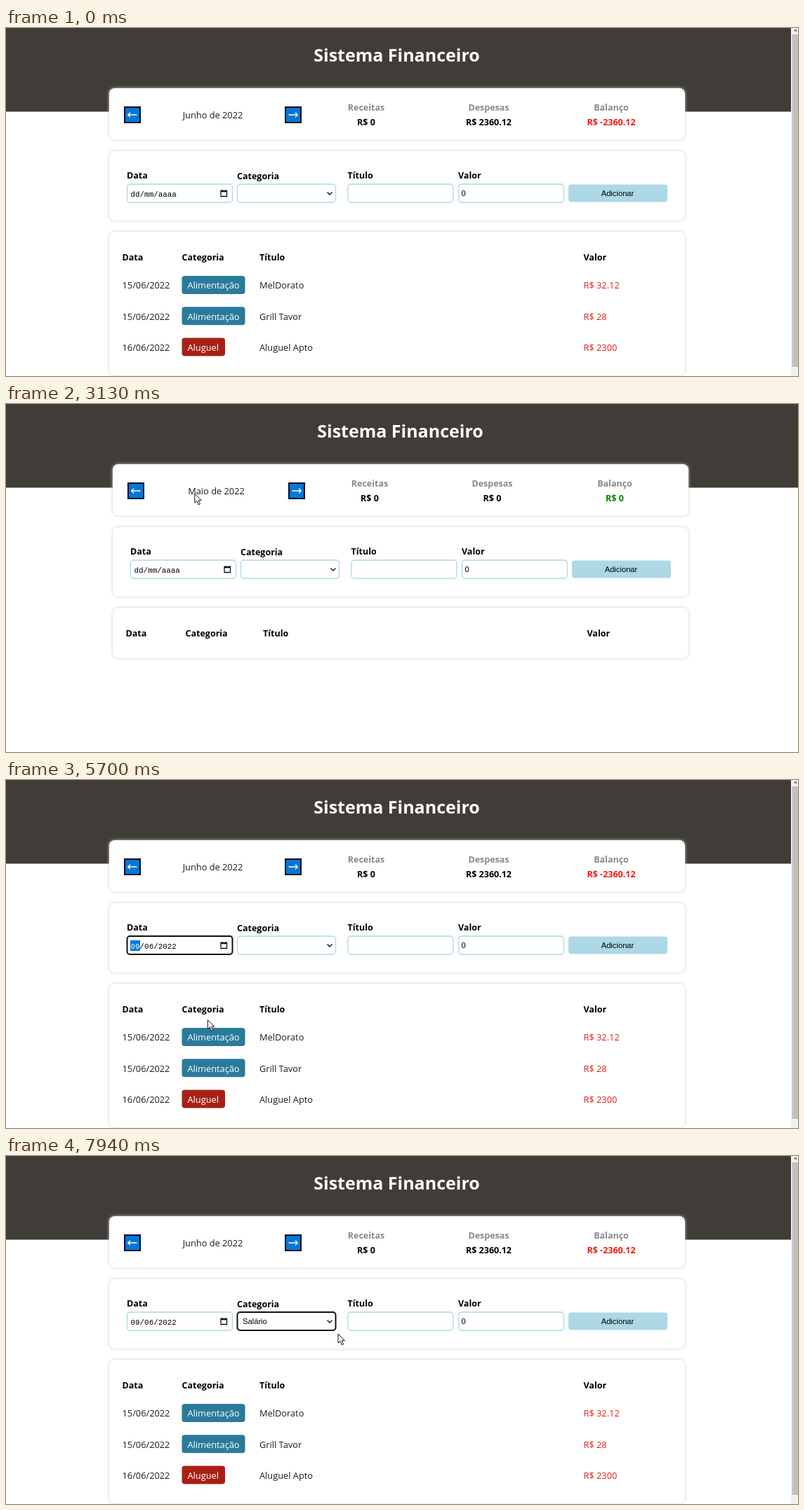
Write an HTML page that moves like this. It is 1128 px wide and 497 px high and loops after 8000 ms.

```html
<!DOCTYPE html>
<html lang="pt-BR">
<head>
<meta charset="utf-8">
<title>Sistema Financeiro</title>
<style>
  html, body { margin: 0; width: 100%; height: 100%; overflow: hidden; background: #fff; }
  svg { display: block; width: 1128px; height: 497px; }
  text { font: 12.8px "Open Sans", "Noto Sans", sans-serif; fill: #1c1c1c; white-space: pre; }
  .b { font-weight: 700; font-size: 12.5px; fill: #000; }
  .h1 { font-weight: 700; font-size: 25px; fill: #fff; }
  .mid { text-anchor: middle; }
  .grey { fill: #888; }
  .red { fill: #ec1c0e; }
  .green { fill: green; }
  .white { fill: #fff; }
  .ui { font: 11.2px "Liberation Sans", Arial, sans-serif; fill: #000; }
  .mono { font: 10.9px "Liberation Mono", monospace; fill: #000; }
  .cal { font: 10.1px "Liberation Sans", Arial, sans-serif; fill: #111; }
  .strong { font-weight: 700; }
  .dim { fill: #777; }
  .link { fill: #1b70c0; }
  .ui.white, .mono.white, .cal.white { fill: #fff; }
  .card { fill: #fff; filter: drop-shadow(0 0 2px #ccc); }
  .line { fill: none; stroke: #111; stroke-width: 1.3; }
</style>
</head>
<body>
<svg id="stage" viewBox="0 0 1128 497"></svg>
<script>
const LOOP = 8000;
const stage = document.getElementById('stage');

// Pointer path: time, x, y
const path = [
  [390, 936, 262], [600, 780, 140], [800, 540, 89], [1060, 205, 122], [1190, 270, 126],
  [1400, 411, 122], [1660, 411, 122], [2060, 184, 131], [2130, 186, 132], [2860, 186, 132],
  [3530, 417, 121], [3750, 417, 121], [4420, 445, 205], [4490, 457, 226], [4690, 306, 233],
  [4890, 306, 233], [5240, 264, 340], [5370, 284, 346], [5640, 284, 346], [6230, 394, 232],
  [6390, 394, 232], [6930, 401, 286], [7130, 401, 288], [7200, 402, 294], [7340, 402, 294],
  [7440, 403, 289], [7540, 403, 294], [7790, 403, 294], [7940, 473, 254]
];
const clicks = [1500, 2330, 2790, 3620, 4760, 5570, 6320, 7740];

const text = (x, y, s, cls = '') => `<text x="${x}" y="${y}" class="${cls}">${s}</text>`;
const box = (x, y, w, h, fill, r = 0, more = '') =>
  `<rect x="${x}" y="${y}" width="${w}" height="${h}" rx="${r}" fill="${fill}" ${more}/>`;
const line = (d, more = '') => `<path class="line" d="${d}" ${more}/>`;
const card = (y, h) => `<rect class="card" x="147" y="${y}" width="820" height="${h}" rx="8"/>`;
const within = (t, a, b) => t >= a && t < b;

function pointerAt(t) {
  if (t < path[0][0]) return null;
  const i = path.findIndex(k => k[0] > t);
  if (i < 0) return path[path.length - 1].slice(1);
  const [t0, x0, y0] = path[i - 1], [t1, x1, y1] = path[i];
  const u = (t - t0) / (t1 - t0), e = u * u * (3 - 2 * u);
  return [x0 + (x1 - x0) * e, y0 + (y1 - y0) * e];
}

function monthAt(t) {
  if (within(t, 1590, 2400)) return 'Julho';
  return within(t, 2860, 3690) ? 'Maio' : 'Junho';
}

function field(x, w, focus) {
  return focus
    ? box(x + .5, 223, w - 1, 26, '#fff', 4, 'stroke="#101010" stroke-width="2"')
    : box(x + .5, 223, w - 1, 26, '#fff', 4, 'stroke="#add8e6" stroke-width="1.3"');
}

function arrowButton(x, dir) {
  const c = x + 12;
  return box(x + 1, 113, 22, 22, '#0078d7', 0, 'stroke="#0a0a1e" stroke-width="2"') +
    line(`M${c - 6.5 * dir},124H${c + 6 * dir}M${c + 3 * dir},120.8L${c + 6.3 * dir},124L${c + 3 * dir},127.2`,
      'style="stroke:#fff"');
}

function summary(month, empty) {
  const item = (x, label, value, cls = '') =>
    text(x, 117.5, label, 'b mid grey') + text(x, 139, value, 'b mid ' + cls);
  return card(86, 73.5) + arrowButton(168, -1) + arrowButton(397, 1) +
    text(294.5, 128.5, month + ' de 2022', 'mid') +
    item(513, 'Receitas', 'R$ 0') +
    item(687.5, 'Despesas', empty ? 'R$ 0' : 'R$ 2360.12') +
    item(862, 'Balanço', empty ? 'R$ 0' : 'R$ -2360.12', empty ? 'green' : 'red');
}

function form(t) {
  const date = t < 5640 ? 'dd/mm/aaaa' : '09/06/2022';
  const dateFocus = within(t, 4760, 6320);
  return card(176, 99) +
    text(172, 215, 'Data', 'b') + text(329, 216, 'Categoria', 'b') +
    text(486.5, 215, 'Título', 'b') + text(644, 215, 'Valor', 'b') +
    field(172, 151, dateFocus) + field(329, 141, t >= 6320) + field(486.5, 151) + field(644, 151) +
    text(177.5, 240.5, date, 'mono') +
    (dateFocus ? box(177, 229, 14, 15, '#0078d7') + text(177.5, 240.5, date.slice(0, 2), 'mono white') : '') +
    line('M306,232.5H314.5V240.5H306ZM306,233.5H314.5M307.5,231V232M313,231V232') +
    line('M457.5,234.5L461,238L464.5,234.5', 'stroke-width="2"') +
    (t >= 7800 ? text(337, 240, 'Salário', 'ui') : '') +
    text(648.5, 240, '0', 'ui') +
    box(801, 223.5, 141, 25, '#add8e6', 4) + text(871, 240, 'Adicionar', 'ui mid');
}

function table(empty) {
  const rows = empty ? [] : [
    ['15/06/2022', 'Alimentação', 'MelDorato', '32.12'],
    ['15/06/2022', 'Alimentação', 'Grill Tavor', '28'],
    ['16/06/2022', 'Aluguel', 'Aluguel Apto', '2300']
  ];
  return card(291, empty ? 72 : 205) +
    text(165.5, 332, 'Data', 'b') + text(250.5, 332, 'Categoria', 'b') +
    text(361, 332, 'Título', 'b') + text(822.5, 332, 'Valor', 'b') +
    rows.map(([date, kind, title, value], i) => {
      const y = 372.3 + 44.3 * i, rent = kind === 'Aluguel';
      return text(165.5, y, date) +
        box(250.5, y - 18.3, rent ? 61.5 : 90, 26, rent ? '#a82015' : '#2a7b9b', 4) +
        text(258.5, y, kind, 'white') + text(361, y, title) + text(822.5, y, 'R$ ' + value, 'red');
    }).join('');
}

function calendar([px, py]) {
  let s = box(172.5, 249.5, 182, 235, '#fff', 0, 'stroke="#b8b8b8"') +
    text(181, 272, 'junho de 2022', 'cal strong') + '<path d="M251.5,267h6l-3,3.5z"/>' +
    line('M307,276V263.5M301.5,269L307,263.5L312.5,269M334,263V275.5M328.5,270L334,275.5L339.5,270');
  [...'DSTQQSS'].forEach((d, i) => s += text(193.5 + 23.45 * i, 303, d, 'cal mid'));
  for (let i = 0; i < 42; i++) {
    const x = 193.5 + 23.45 * (i % 7), y = 323.3 + 23.45 * Math.floor(i / 7);
    const n = i - 2, inside = n > 0 && n < 31;
    const day = n < 1 ? n + 31 : n > 30 ? n - 30 : n;
    const over = Math.abs(px - x) < 11.7 && Math.abs(py - y) < 11.7;
    let cls = inside ? '' : 'dim';
    if (n === 2) {
      s += box(x - 10.8, y - 10.8, 21.6, 21.6, '#1a75ff', 1, 'stroke="#101010" stroke-width="2"');
      cls = 'white strong';
    } else if (over) s += box(x - 11.5, y - 11.5, 23, 23, '#dcebff', 2);
    s += text(x, y + 3.8, day, 'cal mid ' + cls);
  }
  return s + text(191, 470, 'Limpar', 'cal link') + text(315.5, 470, 'Hoje', 'cal link');
}

function dropdown(py) {
  const active = Math.max(0, Math.min(3, Math.floor((py - 249.5) / 14.6)));
  return box(330, 249.5, 139, 59, '#fff', 0, 'stroke="#222"') +
    ['', 'Alimentação', 'Aluguel', 'Salário'].map((s, i) => {
      const y = 249.8 + 14.6 * i, on = i === active;
      return (on ? box(330.5, y, 138, 14.6, '#1967d2') : '') + text(334, y + 11, s, on ? 'ui white' : 'ui');
    }).join('');
}

function pointer([x, y], t) {
  const hand = Math.abs(y - 124) < 13 && (Math.abs(x - 180) < 13 || Math.abs(x - 409) < 13);
  const shape = hand
    ? 'M-1.7,1.5Q0,-1 1.7,1.5V7Q4,5.5 4.6,8Q7,7 7.2,9Q9,8.4 9,10.5V14Q9,16.5 7.2,18V20H-.5V18.3L-5.3,12.5Q-6,9.6 -3.6,10L-1.7,12ZM1.7,7V11M4.6,8V11M7.2,9V11.5'
    : 'M0,0V13.2L3,10.4L5.3,15.8L7.6,14.8L5.3,9.6H9.4Z';
  const ring = clicks.some(c => within(t, c, c + 65));
  return `<g transform="translate(${x.toFixed(1)} ${y.toFixed(1)})">` +
    `<path d="${shape}" fill="#fff" stroke="#111" stroke-linejoin="round"/>` +
    (ring ? '<circle r="11" fill="#ff0" opacity=".5"/>' : '') + '</g>';
}

function scrollbar() {
  return box(1118, 0, 10, 497, '#f1f1f1') + box(1119.5, 9, 8.5, 475, '#c1c1c1') +
    '<path d="M1121.5,4.5l3,-3l3,3z" fill="#777"/>';
}

function scene(t) {
  const month = monthAt(t), empty = month !== 'Junho', p = pointerAt(t);
  return box(0, 0, 1128, 119.5, '#403c37') +
    `<g transform="translate(${empty ? 5 : 0} 0)">` +
    text(556.5, 48, 'Sistema Financeiro', 'h1 mid') + summary(month, empty) + form(t) + table(empty) + '</g>' +
    (empty ? '' : scrollbar()) +
    (within(t, 4830, 5640) ? calendar(p) : '') +
    (within(t, 6320, 7800) ? dropdown(p[1]) : '') +
    (p ? pointer(p, t) : '');
}

let last = '';
function tick() {
  const now = scene(performance.now() % LOOP);
  if (now !== last) stage.innerHTML = last = now;
  requestAnimationFrame(tick);
}
tick();
</script>
</body>
</html>
```
